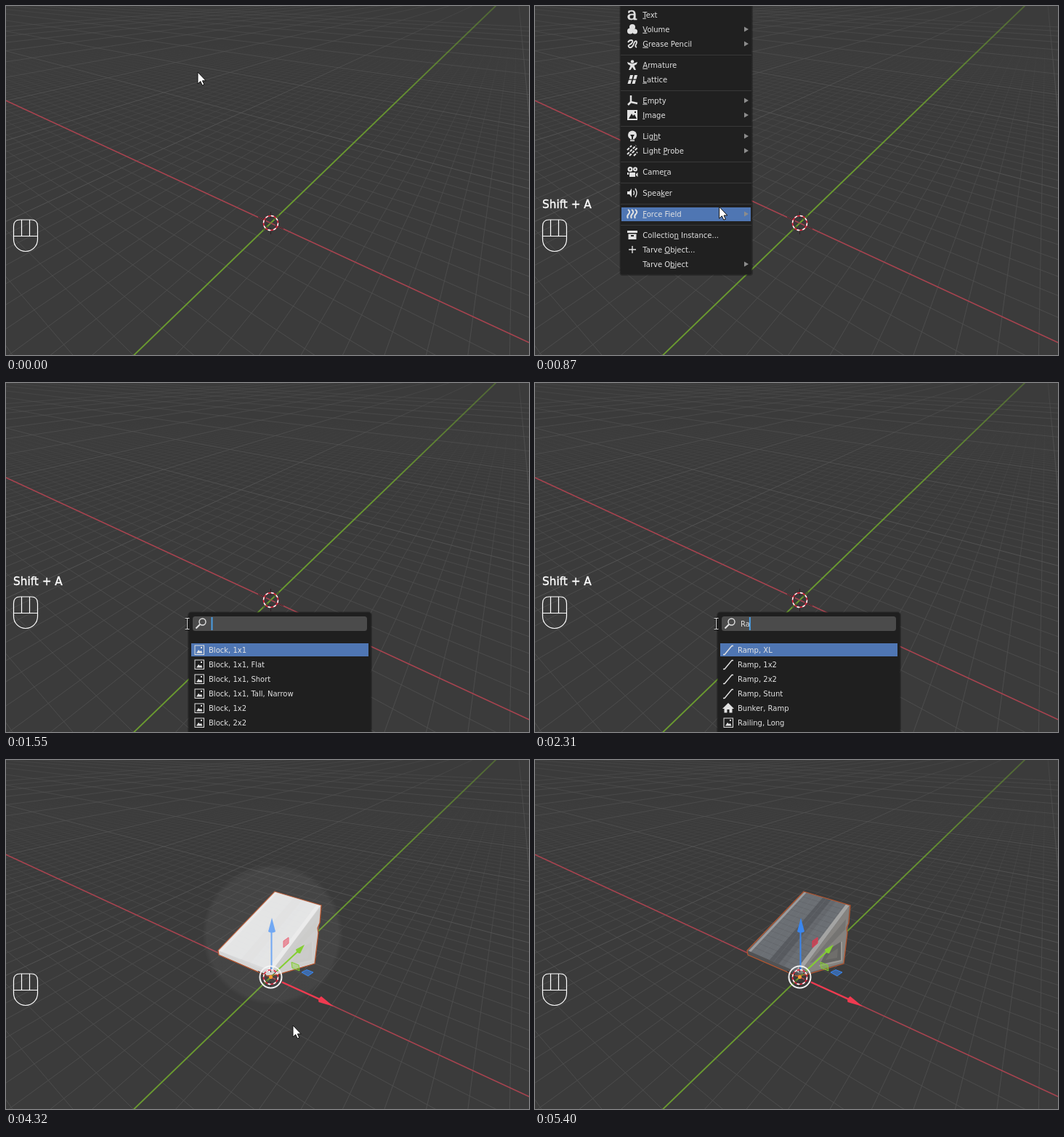
Recreate the animation shown at these times as an HTML page with a canvas. Size 720 px wide and 480 px high, loop 5770 ms.

```html
<!DOCTYPE html>
<html lang="en">
<head>
<meta charset="utf-8">
<title>Add object menu</title>
<style>
  html, body { margin: 0; width: 100%; height: 100%; overflow: hidden; background: #3b3b3b; }
  canvas, svg { position: absolute; left: 0; top: 0; width: 720px; height: 480px; }
  text { font: 10px "DejaVu Sans", sans-serif; fill: #e2e2e2; white-space: pre; }
  .big { font-size: 15.3px; fill: #fff; stroke: #fff; stroke-width: .35; }
  .line { fill: none; stroke: #e2e2e2; stroke-width: 1.4; }
  .icon { fill: #e2e2e2; }
  .hole { fill: #202020; }
</style>
</head>
<body>
<canvas id="grid" width="720" height="480"></canvas>
<svg viewBox="0 0 720 480">
  <defs>
    <path id="outline" d="M370 181L434 200L432 224L429 231L430 238L425 280L374 295L360 297L293 268L292 262Z"/>
    <radialGradient id="halo">
      <stop offset=".93" stop-color="#fff" stop-opacity=".05"/>
      <stop offset="1" stop-color="#fff" stop-opacity="0"/>
    </radialGradient>
  </defs>

  <g id="object">
    <circle class="flash" cx="367" cy="240" r="97" fill="url(#halo)"/>
    <use href="#outline" fill="#5d5e5f"/>
    <path d="M433 200L430 237L425 279L372 294L364 293Z" fill="#858380"/>
    <path d="M428 219L427 233L383 278L378 279Z" fill="#757472"/>
    <path d="M402 262L421 250L421 275L392 281Z" fill="#636361"/>
    <path d="M406 266L417 259L416 272L400 275Z" fill="#6f6e6b"/>
    <path d="M422 250V276L391 283" fill="none" stroke="#9a9894" stroke-width="2"/>
    <path d="M292 262L364 292L360 297L293 268Z" fill="#515254"/>
    <g id="deck"></g>
    <use href="#outline" class="flash" data-max=".82" fill="#f2f2f2"/>
    <path class="flash" data-max=".3" d="M433 200L430 237L425 279L372 294L364 293Z" fill="#aaa9a6"/>
    <use href="#outline" fill="none" stroke="#b3552f" stroke-width="1.3"/>
  </g>

  <g id="cursor3d" fill="none">
    <path d="M347 290.500L358 295.500M371 301.500L382 306.500M364.500 283V292M364.500 305V314" stroke="#2c2124"/>
    <path d="M354 308.500L360 303M369 294L376 287.500" stroke="#2d3a1c"/>
    <path d="M360 303L369 294" stroke="#6a9a2f" stroke-width="1.5"/>
    <path d="M361 297L368 300" stroke="#9e404d"/>
    <circle cx="364.500" cy="298.500" r="10" stroke="#e0263c" stroke-width="1.5"/>
    <circle cx="364.500" cy="298.500" r="10" stroke="#fff" stroke-width="1.5" stroke-dasharray="3.927"/>
  </g>

  <g id="gizmo">
    <path d="M365.500 288V236" stroke="#3a86ee" stroke-width="2"/>
    <path d="M366 217L371 236Q366 239 361 236Z" fill="#3a86ee"/>
    <path d="M380 305.500L432 329" stroke="#f03a50" stroke-width="2"/>
    <path d="M451 339L430.500 333Q429 328 434 325Z" fill="#f03a50"/>
    <path d="M373 290L402 263" stroke="#84cf32" stroke-width="2"/>
    <path d="M411 254L405 266Q400 266 399 260.500Z" fill="#84cf32"/>
    <path d="M382 249L389 244L389 252L382 258Z" fill="#e0384f" fill-opacity=".7" stroke="#e0384f"/>
    <path d="M393 278L403 282L404 290L394 286Z" fill="#84cf32" fill-opacity=".4" stroke="#84cf32"/>
    <path d="M407 292L414 288.500L423 292L416 297Z" fill="#3a86ee" fill-opacity=".6" stroke="#3a86ee"/>
    <circle cx="364.500" cy="298.500" r="15" fill="none" stroke="#f2f2f2" stroke-width="2"/>
    <circle cx="364.500" cy="298.500" r="2.500" fill="#ff9a2e"/>
    <path class="flash" data-max=".28" d="M370 181L434 200L366 290L292 262Z" fill="#fff"/>
  </g>

  <g fill="none" stroke="#fff" stroke-width="1.2">
    <path d="M10.500 303Q10.500 294 19.500 294H34.500Q43.500 294 43.500 303V321A16.500 16.500 0 0 1 10.500 321ZM10.500 316.500H43.500M21.500 294V316.500M32.500 294V316.500"/>
    <rect id="keyBox" x="56.500" y="304.500" width="41" height="23" rx="4"/>
  </g>
  <text id="keyText" class="big" x="59" y="321">Shift</text>
  <text id="combo" class="big" x="10" y="278">Shift + A</text>

  <g id="menu">
    <rect x="116.500" y="-10" width="183.500" height="381" rx="4" fill="#000" opacity=".25"/>
    <rect x="117.500" y="-10" width="181" height="379.500" rx="3" fill="#202020"/>
    <rect id="menuBar" x="119" width="178" height="19" fill="#4f76b3"/>
    <g id="menuRows"></g>
  </g>

  <g id="search">
    <rect x="250" y="314.500" width="254" height="180" rx="5" fill="#000" opacity=".25"/>
    <rect x="251.500" y="315.500" width="251" height="180" rx="4" fill="#1f1f1f"/>
    <rect x="257" y="321" width="240" height="20" rx="3.500" fill="#4b4b4b"/>
    <g class="line"><circle cx="270.500" cy="328.500" r="4.500"/><path d="M267 332L261.500 337.500" stroke-width="2"/></g>
    <text id="query" x="283" y="334.700"></text>
    <rect id="caret" y="322" width="2" height="18" fill="#4a9de3"/>
    <rect x="255" y="358" width="244" height="18" fill="#4f76b3"/>
    <g id="results"></g>
  </g>

  <path id="arrow" d="M0 0V16L3.700 12.600L6.200 18L8.800 17L6.400 11.800H11.200Z" fill="#fff" stroke="#111"/>
  <g id="beam" fill="none">
    <path d="M-3 -7.500H3M0 -7.500V7.500M-3 7.500H3" stroke="#111" stroke-width="2.600"/>
    <path d="M-3 -7.500H3M0 -7.500V7.500M-3 7.500H3" stroke="#ddd"/>
  </g>
</svg>

<script>
const $ = id => document.getElementById(id);
const LOOP = 5770;

// Ground plane: every grid line runs into one of two vanishing points.
const O = [364.5, 298.5], VX = [-343, -28.5], VY = [703.5, -28.5];
const P = -0.0353, Q = 0.0511;
const c = $('grid').getContext('2d');

function ground(x, y) {
  const w = 1 + P * x + Q * y;
  return [0, 1].map(i => (O[i] + VX[i] * P * x + VY[i] * Q * y) / w);
}
function ray(v, p) {
  c.beginPath();
  c.moveTo(...v);
  c.lineTo(v[0] + (p[0] - v[0]) * 12, v[1] + (p[1] - v[1]) * 12);
  c.stroke();
}
function fade(rgb, ...stops) {
  const g = c.createLinearGradient(0, 0, 0, 480);
  stops.forEach(([y, a]) => g.addColorStop(y / 480, `rgba(${rgb},${a})`));
  return g;
}
function lines(step, far, style) {
  c.strokeStyle = style;
  for (let i = -far; i <= far; i += step) {
    if (!i || (step === 1 && i % 10 === 0)) continue;
    if (i <= 10) ray(VY, ground(i, 0));
    if (i >= -9) ray(VX, ground(0, i));
  }
}
function drawGrid() {
  c.fillStyle = '#3b3b3b';
  c.fillRect(0, 0, 720, 480);
  c.lineWidth = 1;
  lines(1, 60, fade('77,77,77', [0, 0], [50, 0], [110, .35], [250, .8], [480, .95]));
  lines(10, 100, fade('82,82,82', [0, .35], [70, .7], [180, 1], [480, 1]));
  c.lineWidth = 1.6;
  c.strokeStyle = '#a8434f';
  ray(VX, ground(1, 0));
  c.lineWidth = 1.9;
  c.strokeStyle = fade('106,154,47', [0, .45], [130, .9], [220, 1], [480, 1]);
  ray(VY, ground(0, 1));
}

// Ramp deck: strips between the low edge and the high edge.
const mix = (a, b, u) => [a[0] + (b[0] - a[0]) * u, a[1] + (b[1] - a[1]) * u];
const HIGH = [[370, 181], [433, 200]], LOW = [[293, 262], [364, 293]];
const deck = (u, v) => mix(mix(...LOW, u), mix(...HIGH, u), v);
function strip(u0, u1, fill) {
  const pts = [deck(u0, 0), deck(u1, 0), deck(u1, 1), deck(u0, 1)];
  return `<polygon points="${pts.join(' ')}" fill="${fill}"/>`;
}
function drawDeck() {
  let s = strip(0, 1, '#6b6f74') + strip(.42, .6, '#585b60') + strip(.6, .7, '#65686d');
  for (let i = 1; i < 14; i++)
    s += `<path d="M${deck(0, i / 14)}L${deck(1, i / 14)}" stroke="#505255" stroke-opacity=".25"/>`;
  for (let i = 1; i < 8; i++)
    s += `<path d="M${deck(i / 8, 0)}L${deck(i / 8, 1)}" stroke="#7c7f82" stroke-opacity=".25"/>`;
  $('deck').innerHTML = s + strip(.015, .06, '#9c9d9f') + strip(.92, 1, '#a4a4a3');
}

const ICONS = {
  text: '<text x="-7.500" y="7" style="font:24px \'DejaVu Serif\',serif;stroke:#e2e2e2;stroke-width:.6">a</text>',
  cloud: '<circle cy="-3" r="4"/><circle cx="-3" cy="2.500" r="4"/><circle cx="3.500" cy="3" r="3.500"/>',
  pencil: '<path class="line" style="stroke-width:1.8" d="M-6 -2C-4 -6 2 -6 0 -2S-7 1 -5 4S1 4 2 0S6 -5 6 -2S2 3 6 5"/>',
  bones: '<circle cy="-4.500" r="2.300"/><path d="M-7 -4L0 -1.500L7 -4L6 -1L2.500 1L5 7H2.500L0 3L-2.500 7H-5L-2.500 1L-6 -1Z"/>',
  lattice: '<path d="M-3 -6H1L-.5 -.5H-4.500ZM3 -6H7L5.500 -.5H1.500ZM-5 .8H-1L-2.500 6H-6.500ZM1 .8H5L3.500 6H-.5Z"/>',
  axes: '<path class="line" style="stroke-width:2.500" d="M-2 -7V2L-6 6M-2 2L7 4"/>',
  image: '<path fill-rule="evenodd" d="M-7 -7H7V7H-7ZM-5 5L-1 -2L1 1L3 -1L6 5ZM3 -5V-3H5V-5Z"/>',
  bulb: '<circle cy="-1.500" r="6"/><path d="M-3 3H3V7H-3Z"/><path class="hole" d="M-3 -2H3L1 1V4H-1V1ZM-3 4.500H3V5.500H-3Z"/>',
  probe: '<path class="line" style="stroke-width:2;stroke-dasharray:4 1.500" d="M-7 -1L-1 -7M-7 5L5 -7M-4 7L7 -4M2 7L7 2"/>',
  camera: '<circle cx="-3" cy="-3.500" r="3.500"/><circle cx="4" cy="-3.500" r="3"/><path d="M-4 1H4V7H-4ZM5 3L7.500 1V7L5 5ZM-7 1H-5V4H-7Z"/><circle class="hole" cx="-3" cy="-3.500" r="1.200"/><circle class="hole" cx="4" cy="-3.500" r="1"/>',
  speaker: '<path d="M-7 -2H-4L-1 -6V6L-4 2H-7Z"/><path class="line" d="M1.500 -3Q3.500 0 1.500 3M4 -6Q8 0 4 6"/>',
  force: '<path class="line" style="stroke-width:2" d="M-6 -6Q-2 -3 -5 0T-6 6M-1 -6Q3 -3 0 0T-1 6M4 -6Q8 -3 5 0T4 6"/>',
  box: '<path fill-rule="evenodd" d="M-7 -6H7V-3H-7ZM-5.500 -1.500H5.500V6H-5.500ZM-2 0V2H2V0Z"/>',
  plus: '<path class="line" d="M-5 0H5M0 -5V5"/>',
  ramp: '<path class="line" d="M-7 6.500H-5L5 -5.500H7"/>',
  house: '<path d="M0 -7L8 1H5.500V6.500H1.500V2H-1.500V6.500H-5.500V1H-8Z"/>',
  frame: '<rect class="line" x="-6" y="-6" width="12.500" height="12.500" style="stroke-width:1"/><path d="M-4 4.500L-1 0L1 2L3 1L4.500 4.500ZM2 -4H4V-2H2Z"/>',
  deck: '<path class="line" d="M-6 3V-2H6.500V3"/>'
};
const icon = (name, x, y) => name ? `<g class="icon" transform="translate(${x} ${y})">${ICONS[name]}</g>` : '';

// Label, centre line, icon, underlined letter, has submenu.
const ROWS = [
  ['Text', 12, 'text', 0, 0], ['Volume', 32, 'cloud', 0, 1], ['Grease Pencil', 52, 'pencil', 0, 1],
  ['Armature', 81, 'bones', 0, 0], ['Lattice', 101, 'lattice', 0, 0],
  ['Empty', 130, 'axes', 0, 1], ['Image', 150, 'image', 0, 1],
  ['Light', 179, 'bulb', 3, 1], ['Light Probe', 199, 'probe', 6, 1],
  ['Camera', 228, 'camera', 4, 0], ['Speaker', 257, 'speaker', 4, 0], ['Force Field', 286, 'force', 0, 1],
  ['Collection Instance...', 315, 'box', 9, 0], ['Tarve Object...', 335, 'plus', 6, 0], ['Tarve Object', 355, '', 7, 1]
];
function drawMenu() {
  $('menuRows').innerHTML = ROWS.map(([s, y, ic, u, sub], i) => {
    const gap = i + 1 < ROWS.length && ROWS[i + 1][1] - y > 20;
    return icon(ic, 134, y) +
      `<text x="148.300" y="${y + 3.7}">${s.slice(0, u)}<tspan text-decoration="underline">${s[u]}</tspan>${s.slice(u + 1)}</text>` +
      (sub ? `<path d="M288 ${y - 3.5}L294 ${y}L288 ${y + 3.5}Z" fill="#8c8c8c"/>` : '') +
      (gap ? `<path d="M118 ${y + 15.5}H298" stroke="#383838"/>` : '');
  }).join('');
}

const RAMPS = ['Ramp, XL', 'Ramp, 1x2', 'Ramp, 2x2', 'Ramp, Stunt'];
const LISTS = {
  '': ['Block, 1x1', 'Block, 1x1, Flat', 'Block, 1x1, Short', 'Block, 1x1, Tall, Narrow', 'Block, 1x2', 'Block, 2x2'],
  R: [...RAMPS, 'Railing, Long', 'Railing, Short'],
  Ra: [...RAMPS, 'Bunker, Ramp', 'Railing, Long'],
  Ram: [...RAMPS, 'Bunker, Ramp', 'Platform, Ramped']
};
LISTS.Ramp = LISTS.Ram;
const KINDS = { Ramp: 'ramp', Bunker: 'house', Railing: 'frame', Platform: 'deck', Block: 'frame' };
let shown = null;
function drawSearch(q) {
  if (q === shown) return;
  shown = q;
  $('query').textContent = q;
  $('caret').setAttribute('x', 282.5 + (q ? $('query').getComputedTextLength() - .5 : 0));
  $('results').innerHTML = LISTS[q].map((s, i) => {
    const y = 367 + 20 * i;
    return icon(KINDS[s.split(',')[0]], 266, y) + `<text x="279" y="${y + 3.7}">${s}</text>`;
  }).join('');
}

// Index of the latest of n even ticks from a to b, -1 before the first.
const tick = (t, a, b, n) => t < a ? -1 : Math.min(n - 1, Math.floor((t - a) / (b - a) * (n - 1) + 1e-6));
const smooth = u => u * u * (3 - 2 * u);

function pointer(t) {
  if (t < 1070) return mix([264, 91], [250, 341], smooth(Math.max(0, tick(t, 460, 1020, 10)) / 9));
  if (t < 1550) return [[250, 347], [249, 343], [248, 336], [248, 331]][tick(t, 1220, 1400, 3) + 1];
  if (t < 3720) return mix([249.5, 331], [386.5, 353.5], smooth(Math.max(0, tick(t, 3150, 3540, 7)) / 6));
  if (t < 4320) return mix([386.5, 353.5], [396.5, 365], (tick(t, 3720, 3860, 4) + 1) / 4);
  return mix([395, 365], [580, 492], smooth((tick(t, 5010, 5400, 7) + 1) / 7));
}
function activeRow(t, y) {
  if (t < 520) return 335;
  return ROWS.reduce((best, r) => Math.abs(r[1] - y) < Math.abs(best - y) ? r[1] : best, 12);
}

const within = (t, a, b) => t >= a && t < b;
const show = (id, on) => { $(id).style.display = on ? '' : 'none'; };
const flashes = [...document.querySelectorAll('.flash')];

function render(t) {
  const shift = within(t, 310, 646) || within(t, 2010, 2210);
  const menu = within(t, 460, 1550), search = within(t, 1550, 4320), placed = t >= 4320;
  const [x, y] = pointer(t);
  show('keyBox', shift);
  show('keyText', shift);
  show('combo', within(t, 460, 3215));
  show('menu', menu);
  show('search', search);
  show('object', placed);
  show('gizmo', placed);
  show('arrow', !search);
  show('beam', search);
  $(search ? 'beam' : 'arrow').setAttribute('transform', `translate(${x} ${y})`);
  if (menu) $('menuBar').setAttribute('y', activeRow(t, y) - 9);
  if (search) drawSearch('Ramp'.slice(0, [2110, 2310, 2900, 3150].filter(k => t >= k).length));
  if (placed) {
    const glow = Math.sqrt(1 - tick(t, 4320, 4740, 8) / 7);
    flashes.forEach(f => { f.style.opacity = Math.min(1, glow * 1.18) * (f.dataset.max || 1); });
  }
}

drawGrid();
drawDeck();
drawMenu();
const start = performance.now();
(function frame() {
  render((performance.now() - start) % LOOP);
  requestAnimationFrame(frame);
})();
</script>
</body>
</html>
```
